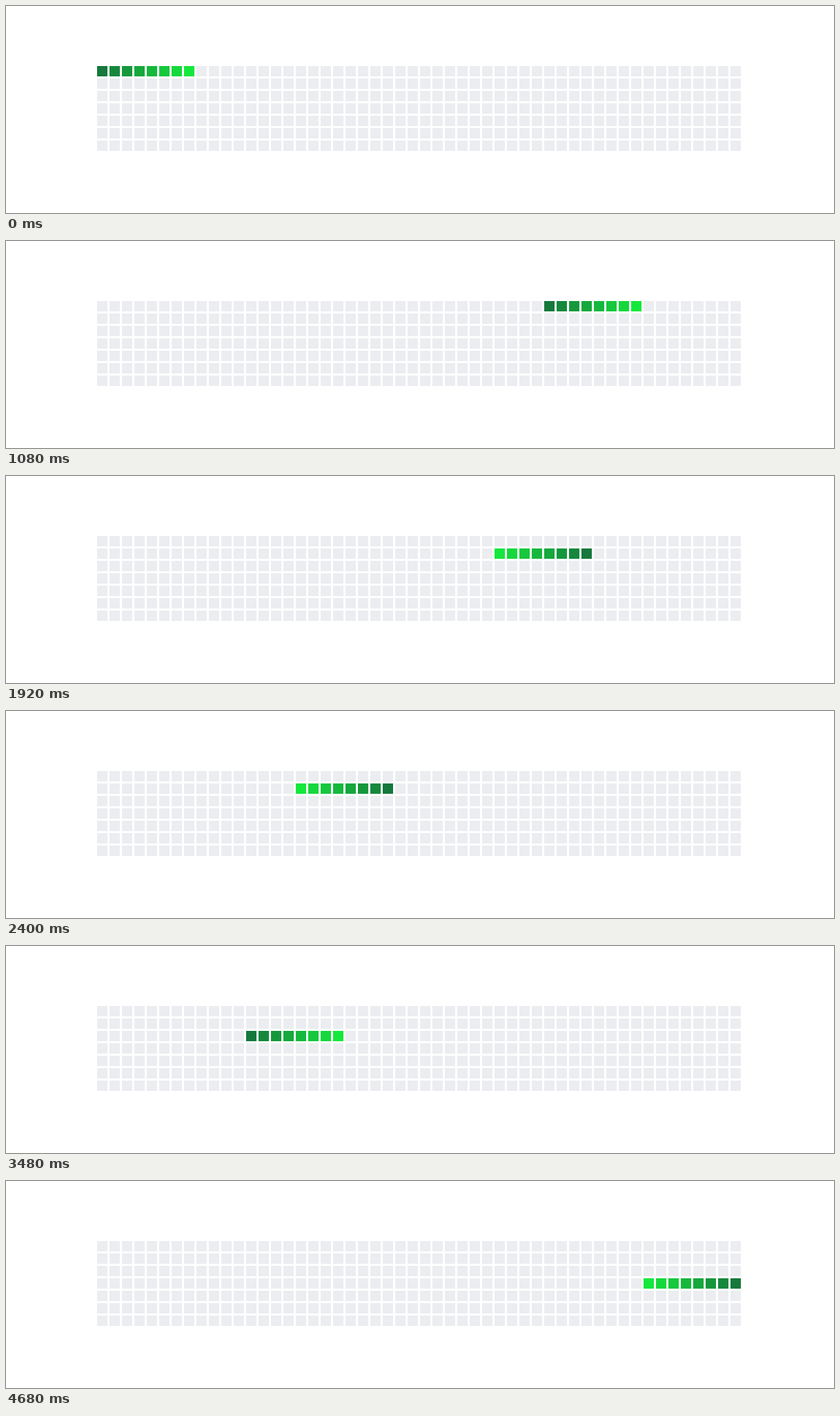
Write an HTML page with a canvas that moves like this. It is 1200 px wide and 300 px high and loops after 4.8 s.

```html
<!DOCTYPE html>
<html lang="en">
<head>
<meta charset="utf-8">
<title>Snake on a grid</title>
<style>
html, body { margin: 0; width: 100%; height: 100%; overflow: hidden; background: #fff; }
canvas { display: block; }
</style>
</head>
<body>
<canvas id="stage" width="1200" height="300"></canvas>
<script>
const ctx = document.getElementById('stage').getContext('2d');
const COLS = 52, ROWS = 7, PITCH = 18, SIZE = 15, LEFT = 132, TOP = 87;
const LENGTH = 8, STRIDE = 4, STEP_MS = 120, STEPS = 40;

// Cells are numbered along a path that turns back at the end of each row.
function cell(n, color) {
  const row = Math.floor(n / COLS), i = n % COLS;
  const col = row % 2 ? COLS - 1 - i : i;
  ctx.fillStyle = color;
  ctx.fillRect(LEFT + col * PITCH, TOP + row * PITCH, SIZE, SIZE);
}

function draw(ms) {
  const step = Math.floor(ms / STEP_MS) % STEPS;
  ctx.fillStyle = '#fff';
  ctx.fillRect(0, 0, 1200, 300);
  for (let n = 0; n < COLS * ROWS; n++) cell(n, '#ebedf0');
  for (let k = 0; k < LENGTH; k++) cell(step * STRIDE + k, `rgb(21,${120 + 16 * k},60)`);
}

function tick() {
  draw(performance.now());
  requestAnimationFrame(tick);
}
tick();
</script>
</body>
</html>
```
